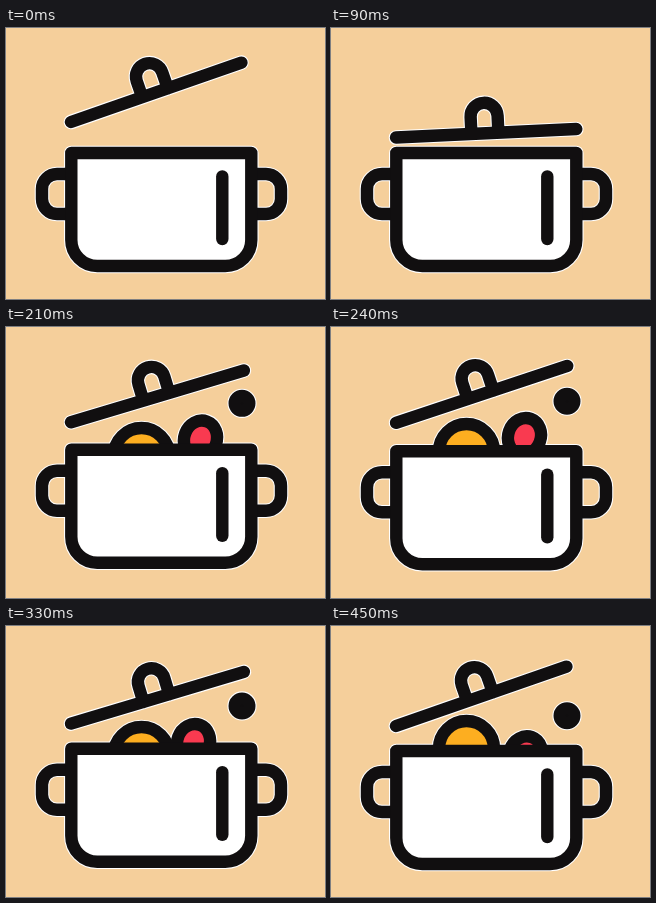
Write an HTML page with a canvas that moves like this. It is 319x271 px and loops after 0.6 s.

```html
<!DOCTYPE html>
<html lang="en">
<head>
<meta charset="utf-8">
<title>Boiling pot</title>
<style>
html, body { margin: 0; width: 100%; height: 100%; overflow: hidden; background: #f5cf9b; }
canvas { display: block; }
</style>
</head>
<body>
<canvas id="stage" width="319" height="271"></canvas>
<script>
const ctx = document.getElementById('stage').getContext('2d');
const INK = '#110f10', STEP = 30, LOOP = 600, LAST_STEP = 15;

const clamp = (v, low, high) => Math.min(high, Math.max(low, v));
const wave = (step, peak, period) => Math.cos(2 * Math.PI * (step - peak) / period);

function path(d, x = 0, y = 0, degrees = 0) {
  const p = new Path2D();
  p.addPath(new Path2D(d), new DOMMatrix().translate(x, y).rotate(degrees));
  return p;
}

function oval(x, y, rx, ry = rx, tilt = 0) {
  const p = new Path2D();
  p.ellipse(x, y, rx, ry, tilt, 0, Math.PI * 2);
  return p;
}

function draw(step) {
  // The lid falls shut, then the boiling food throws it open and rattles the pot.
  const open = Math.max(1 - step / 3, clamp((step - 5) / 2, 0, 1));
  const shake = step > 5 ? (1 - wave(step, 9, 6)) / 2 : 0;
  const sink = clamp((7 - step) / 2, 0, 2);
  const hop = wave(step, 8.5, 12);

  const lidY = 109.5 - 15.5 * open + 0.6 * Math.max(0, step - 5);
  const lidAngle = -2.7 - 16.5 * open + 3.4 * shake;
  const shift = -3 * shake;

  const shapes = [
    [oval(135.5, 122.5 + 8 * shake + 31 * sink, 27.5), '#fdae20'],
    [oval(191 + 3.5 * wave(step, 7, 8), 119 - 10 * hop + 15 * sink, 16.3, 18.6, 0.35), '#f93a50'],
    [oval(236 - 29 * sink, 82 - 8 * hop + 28 * sink, 7.3), INK],
    [path('M75.5 0V-17a13.5 13.5 0 0 1 27 0V0M0 0H180.5', 65, lidY, lidAngle)],
    [path('M65 146H51a15 15 0 0 0-15 15v10a15 15 0 0 0 15 15h14', 0, shift)],
    [path('M245 146h15a15 15 0 0 1 15 15v10a15 15 0 0 1-15 15h-15', 0, shift)],
    [path('M65.3 125H245.3V212a26 26 0 0 1-26 26H91.3a26 26 0 0 1-26-26Z', 0, shift), '#fff'],
    [path('M216.3 148.5V211', 0, shift)]
  ];
  ctx.fillStyle = '#f5cf9b';
  ctx.fillRect(0, 0, 319, 271);
  ctx.lineCap = ctx.lineJoin = 'round';

  ctx.strokeStyle = '#fff';
  ctx.lineWidth = 14.6;
  for (const [shape] of shapes) ctx.stroke(shape);

  ctx.strokeStyle = INK;
  ctx.lineWidth = 12.4;
  for (const [shape, fill] of shapes) {
    if (fill) {
      ctx.fillStyle = fill;
      ctx.fill(shape);
    }
    ctx.stroke(shape);
  }
}

function tick() {
  draw(Math.min(LAST_STEP, Math.floor(performance.now() % LOOP / STEP)));
  requestAnimationFrame(tick);
}
tick();
</script>
</body>
</html>
```
